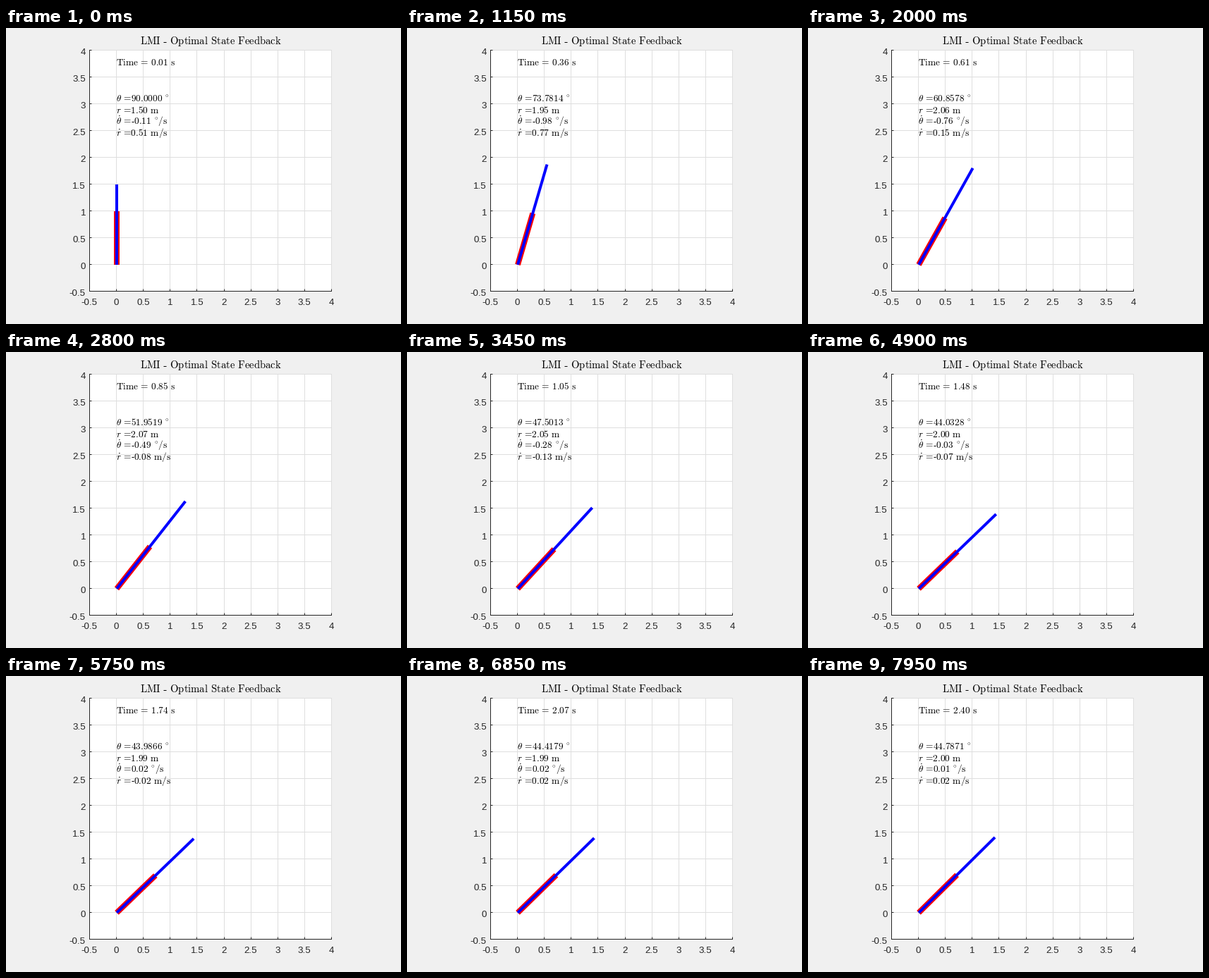
Animation, 560 px wide and 420 px high, one loop 8 s. Source, as a matplotlib script:

```python
import numpy as np
import matplotlib.pyplot as plt
from matplotlib.animation import FuncAnimation
from matplotlib.lines import Line2D
from matplotlib.transforms import Affine2D

W, H = 560, 420
FRAMES, INTERVAL = 160, 50
DT = 0.015                      # simulated seconds per frame
INK = "#262626"
THIRD = r"\hspace{0.38}"        # a third of an em: word space, also hyphen width
EQUALS = r"\hspace{-0.2}=\hspace{-0.2}"

plt.rcParams["mathtext.fontset"] = "cm"
plt.rcParams["font.family"] = "Liberation Sans"


def swing(t, decay, freq):
    """Damped oscillation that starts at 1 with no speed."""
    return np.exp(-decay * t) * (np.cos(freq * t) + decay / freq * np.sin(freq * t))


def angle(t):
    """Arm angle in degrees: settles from 90 to 45, hastened early on."""
    return 45 + 45 * swing(t, 2.33, 1.96) - 12400 * t**4 * np.exp(-13.1 * t)


def radius(t):
    """Arm length: a quick extension to 2, then a slow ripple."""
    return 2 + 0.077 * swing(t - 0.72, 1.66, 2.75) - (0.258 + 3.38 * t) * np.exp(-9.7 * t)


def rate(f, t):
    return (f(t + 2 * DT) - f(t)) / (2 * DT)


def roman(s):
    s = s.replace("=", EQUALS).replace(" ", THIRD)
    return r"\mathrm{" + s + "}"


def label(x, y, s="", px=13.333, **kw):
    """Text whose baseline is y pixels below the top of the stage."""
    return fig.text(x / W, 1 - y / H, s, fontsize=px * 0.72, va="baseline", **kw)


def hyphen(x, y, em):
    xs = np.array([x + 0.011 * em, x + 0.276 * em]) / W
    line = Line2D(xs, [1 - (y - 0.216 * em) / H] * 2, color="black",
                  lw=0.72, solid_capstyle="butt", transform=fig.transFigure)
    fig.add_artist(line)
    return line


fig = plt.figure(figsize=(W / 100, H / 100), dpi=100, facecolor="#f0f0f0")
LEFT, BOTTOM, WIDE, HIGH = 118, 46.55, 343, 342
ax = fig.add_axes([LEFT / W, BOTTOM / H, WIDE / W, HIGH / H])
ax.set(xlim=(-0.5, 4), ylim=(-0.5, 4))
ticks = np.arange(-0.5, 4.1, 0.5)
ax.set_xticks(ticks)
ax.set_yticks(ticks)
ax.tick_params(direction="in", length=2.5, width=0.72, color=INK,
               labelbottom=False, labelleft=False)
ax.set_axisbelow(True)
ax.grid(color="#dedede", lw=0.72, clip_on=False)
for side, spine in ax.spines.items():
    spine.set(color=INK, lw=0.72, visible=side in ("left", "bottom"))

for v in ticks:
    part = (v + 0.5) / 4.5
    label(LEFT + 0.4 + part * WIDE, 393, f"{v:g}", color=INK, ha="center")
    label(113, H - BOTTOM - part * HIGH + 6.3, f"{v:g}", color=INK, ha="right")

label(290, 23, f"${roman('LMI   Optimal State Feedback')}$", px=14.667, ha="center")
hyphen(223.3, 23, 14.667)

# Bars sit on pixel centres, a little off the snapped grid
nudge = ax.transData + Affine2D().translate(0.9, -0.4)
bar = dict(solid_capstyle="butt", transform=nudge)
sleeve, = ax.plot([], [], color="red", lw=5.76, **bar)
rod, = ax.plot([], [], color="blue", lw=2.88, **bar)

clock = label(156, 53)
# symbol, decimals, unit
ROWS = [(r"\theta", 4, r" {}^{\circ}"),
        ("r", 2, " m"),
        (r"\dot{\theta}", 2, r" {}^{\circ}/s"),
        (r"\dot{r}", 2, " m/s")]
baselines = [105 + 16 * i for i in range(len(ROWS))]
readouts = [label(156, y) for y in baselines]
signs = [hyphen(177.5, y - 1, 13.333) for y in baselines]


def draw(k):
    t = k * DT
    deg, r = angle(t), radius(t)
    c, s = np.cos(np.radians(deg)), np.sin(np.radians(deg))
    sleeve.set_data([0, c], [0, s])
    rod.set_data([0, r * c], [0, r * s])

    clock.set_text(f"${roman(f'Time = {DT * (k + 1):.2f} s')}$")
    values = deg, r, np.radians(rate(angle, t)), rate(radius, t)
    for (sym, places, unit), v, text, sign in zip(ROWS, values, readouts, signs):
        num = f"{v:.{places}f}"
        sign.set_visible(num[0] == "-")
        text.set_text(f"${sym}{roman(' =' + num.replace('-', ' ') + unit)}$")
    return [sleeve, rod, clock, *readouts, *signs]


anim = FuncAnimation(fig, draw, frames=FRAMES, interval=INTERVAL,
                     init_func=lambda: draw(0), repeat=True, repeat_delay=0)
plt.show()
```
